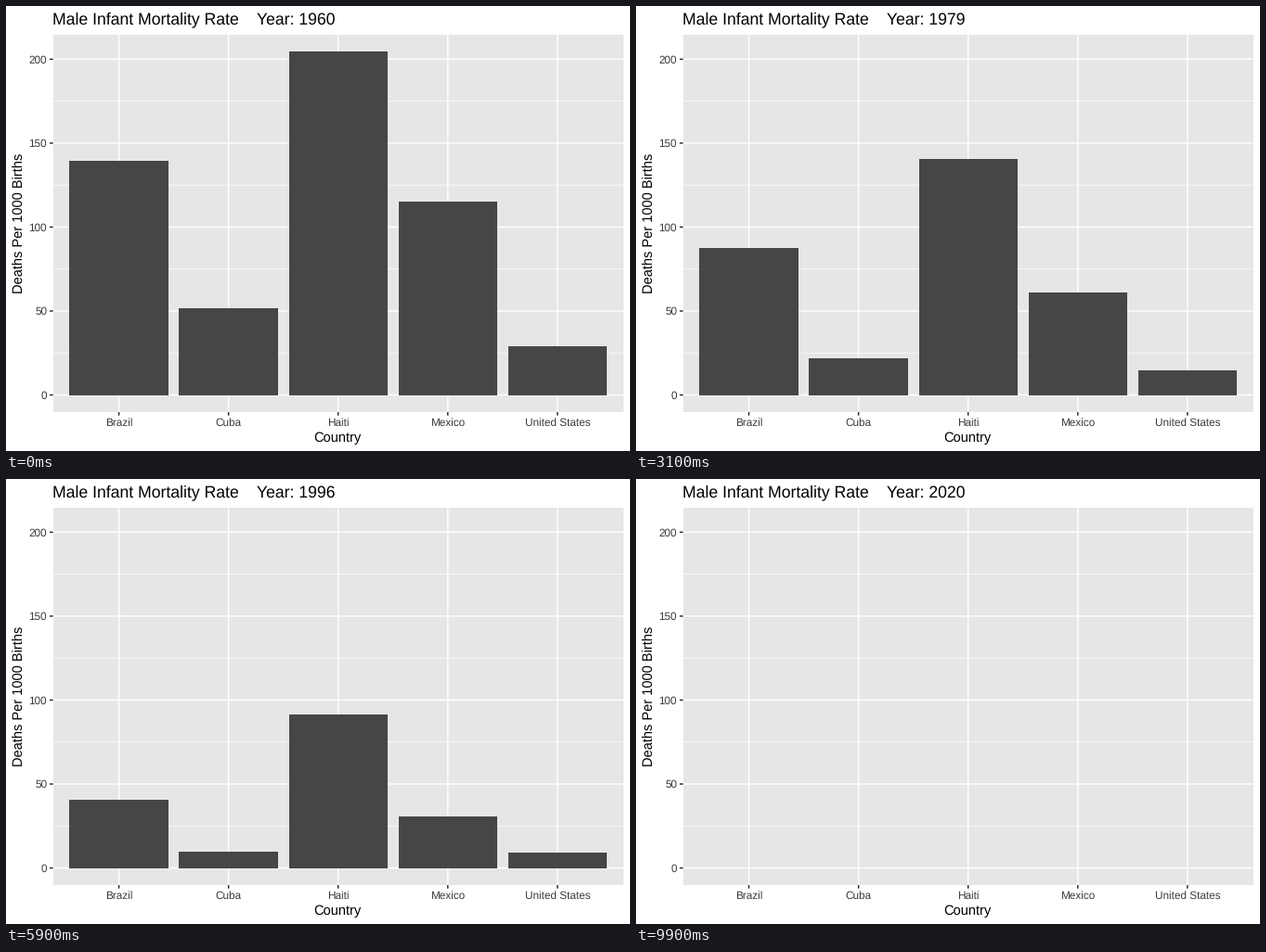
A matplotlib script that plays this animation: 672 by 480 pixels, repeating every 10000 ms.

```python
import matplotlib.pyplot as plt
import numpy as np
from matplotlib.animation import FuncAnimation
from matplotlib.patches import Rectangle

W, H, DPI = 672, 480, 96
FRAMES, INTERVAL = 100, 100
FIRST, LAST, LAST_DATA = 1960, 2020, 2019

LEFT, RIGHT, TOP, BOTTOM = 50.7, 664.7, 30.9, 438.05
BAR, PANEL, TEXT, TICK = "#464646", "#E6E6E6", "#3B3B3B", "#242424"
MAJOR, MINOR = 1.067, 0.533  # line widths in points

# A few key rates per country; decay() fills in every other year.
KEY_YEARS = [1960, 1971, 1979, 1989, 2003, 2013]
RATES = {
    "Brazil": [139.5, 109.7, 87.6, 59.9, 27.9, 16.9],
    "Cuba": [51.7, 32.9, 21.8, 13.0, 6.9, 4.7],
    "Haiti": [204.4, 168.8, 140.6, 111.3, 74.9, 61.0],
    "Mexico": [115.2, 79.8, 61.0, 41.2, 22.9, 16.3],
    "United States": [29.0, 21.3, 14.6, 10.8, 7.5, 6.4],
}
PEAK = max(map(max, RATES.values()))

plt.rcParams.update({
    "font.family": "Liberation Sans",
    "text.hinting": "none",
    "toolbar": "None",
})


def decay(years, rates):
    """Geometric decline between key years, continued after the last one."""
    logs = np.log(rates)
    slope = (logs[-1] - logs[-2]) / (KEY_YEARS[-1] - KEY_YEARS[-2])
    tail = np.maximum(years - KEY_YEARS[-1], 0) * slope
    return np.exp(np.interp(years, KEY_YEARS, logs) + tail)


def x_pos(unit):
    """Discrete axis running from 0.4 to 5.6."""
    return LEFT + (unit - 0.4) / 5.2 * (RIGHT - LEFT)


def y_pos(value):
    """Continuous axis with 5% padding on both ends."""
    return BOTTOM - (0.05 + value / PEAK) / 1.1 * (BOTTOM - TOP)


def line(x, y, color, width, z):
    ax.plot(x, y, color=color, lw=width, zorder=z, snap=False,
            solid_capstyle="butt")


def label(x, y, text, size, color="black", ha="center", rotation=0):
    return ax.text(x, y, text, size=size, color=color, ha=ha, va="baseline",
                   rotation=rotation, rotation_mode="anchor", zorder=5)


def box(x0, x1, y0, y1, color, z):
    """Rectangle with edges on whole pixels."""
    x0, x1, y0, y1 = map(round, (x0, x1, y0, y1))
    return ax.add_patch(Rectangle((x0, y0), x1 - x0, y1 - y0, fc=color, lw=0,
                                  zorder=z, antialiased=False, snap=False))


fig = plt.figure(figsize=(W / DPI, H / DPI), dpi=DPI, facecolor="white")
ax = fig.add_axes([0, 0, 1, 1])
ax.set_xlim(0, W)
ax.set_ylim(H, 0)
ax.axis("off")

box(LEFT, RIGHT, TOP, BOTTOM, PANEL, 0)
for value in range(25, 200, 50):
    y = y_pos(value)
    line([LEFT, RIGHT], [y, y], "white", MINOR, 1)
for value in range(0, 201, 50):
    y = y_pos(value)
    line([LEFT, RIGHT], [y, y], "white", MAJOR, 2)
    line([LEFT - 3.65, LEFT], [y, y], TICK, MAJOR, 4)
    label(44.1, y + 4.2, str(value), 8.8, TEXT, ha="right")

bars = []
for unit, name in enumerate(RATES, 1):
    x = x_pos(unit)
    line([x, x], [TOP, BOTTOM], "white", MAJOR, 2)
    line([x, x], [BOTTOM, BOTTOM + 3.65], TICK, MAJOR, 4)
    label(x, 453, name, 8.8, TEXT)
    bars.append(box(x_pos(unit - 0.45), x_pos(unit + 0.45),
                    y_pos(0), y_pos(0), BAR, 3))

label((LEFT + RIGHT) / 2 - 0.7, 469.7, "Country", 11)
label(19, (TOP + BOTTOM) / 2, "Deaths Per 1000 Births", 11, rotation=90)
title = label(LEFT - 0.7, 19, "", 13.2, ha="left")

# Each year lands on a whole frame; heights move linearly in between.
years = np.arange(FIRST, LAST_DATA + 1)
keys = np.round((years - FIRST) * (FRAMES - 1) / (LAST - FIRST))
yearly = [decay(years, rates) for rates in RATES.values()]


def update(i):
    year = round(FIRST + i * (LAST - FIRST) / (FRAMES - 1))
    title.set_text(f"Male Infant Mortality Rate    Year: {year}")
    for bar, values in zip(bars, yearly):
        bar.set_visible(i <= keys[-1])
        bar.set_height(round(y_pos(np.interp(i, keys, values))) - bar.get_y())
    return [title, *bars]


anim = FuncAnimation(fig, update, frames=FRAMES, interval=INTERVAL,
                     repeat=True, repeat_delay=0, blit=False)
plt.show()
```
